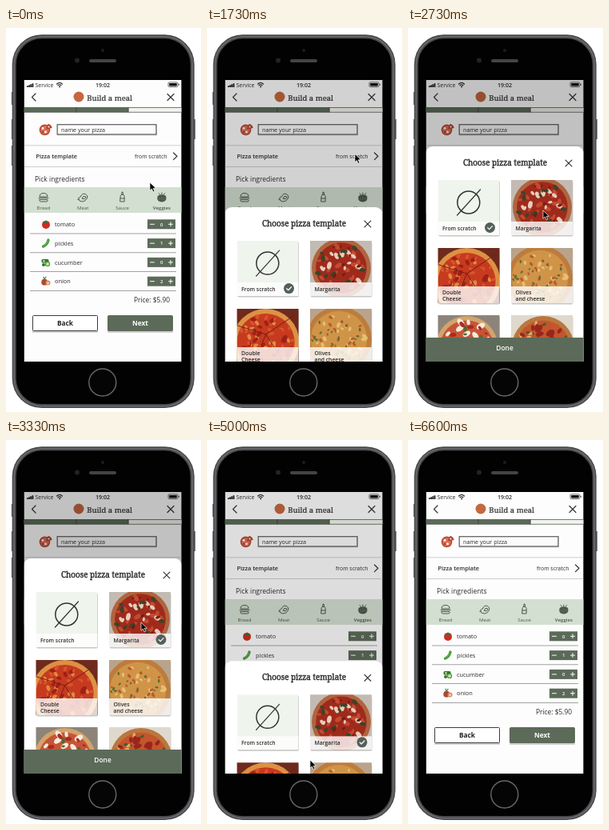
An HTML page that plays this animation: 244x480 px, repeating every 6990 ms.

```html
<!DOCTYPE html>
<html lang="en">
<head>
<meta charset="utf-8">
<title>Build a meal</title>
<style>
html, body { margin: 0; width: 100%; height: 100%; overflow: hidden; background: #fff; }
svg { display: block; }
body > svg { width: 100vw; height: 100vh; }
text { font-family: "Open Sans", "Noto Sans", sans-serif; fill: #2b2b2b; }
.slab { font-family: "Noto Serif", serif; stroke: #2b2b2b; stroke-width: .4; }
.line { fill: none; stroke: #333; stroke-width: 1.2; stroke-linecap: round; stroke-linejoin: round; }
.icon { fill: none; stroke: #4b594b; stroke-width: 1; stroke-linecap: round; stroke-linejoin: round; }
</style>
</head>
<body>
<script>
const LOOP = 6990, STEP = 1000 / 15;
const GREEN = '#5c6b59';

const rect = (x, y, w, h, fill, more = '') =>
  `<rect x="${x}" y="${y}" width="${w}" height="${h}" fill="${fill}" ${more}/>`;
const disc = (x, y, r, fill, more = '') =>
  `<circle cx="${x}" cy="${y}" r="${r}" fill="${fill}" ${more}/>`;
const path = (d, cls = 'line', more = '') => `<path d="${d}" class="${cls}" ${more}/>`;
const shape = (d, fill) => `<path d="${d}" fill="${fill}"/>`;
const text = (x, y, size, str, more = '') =>
  `<text x="${x}" y="${y}" font-size="${size}" ${more}>${str}</text>`;
const bold = 'font-weight="600"', mid = 'text-anchor="middle"';
const cross = (x, y, r) => path(`M${x - r} ${y - r}l${2 * r} ${2 * r}m0 ${-2 * r}l${-2 * r} ${2 * r}`);
const at = (x, y, body) => `<g transform="translate(${x} ${y})">${body}</g>`;

function seeded(seed) {
  return () => (seed = (seed * 16807) % 2147483647) / 2147483647;
}

// Phone body, from the outer rim inwards
function phone() {
  const buttons = [[6.8, 80, 16], [6.8, 114, 25], [6.8, 147, 25], [234, 114, 25]];
  const rims = [[0, '#47474a'], [1.6, '#6c6c70'], [3.2, '#4a4a4d'], [5, '#020202']];
  return buttons.map(([x, y, h]) => rect(x, y, 3, h, '#6a6a6d')).join('') +
    rims.map(([d, fill]) =>
      rect(7.7 + d, 8.3 + d, 228 - 2 * d, 466.8 - 2 * d, fill, `rx="${37 - d}"`)).join('') +
    disc(121, 28, 2, '#1d1d20') + disc(89, 40.5, 3, '#222227') +
    rect(104, 39, 34, 4, '#444447', 'rx="2"') +
    disc(120.8, 443, 17, '#050505', 'stroke="#68686b" stroke-width="1.4"');
}

function statusBar() {
  let s = '';
  for (let i = 0; i < 4; i++) s += rect(26 + i * 2.2, 72.3 - i, 1.7, 1.7 + i, '#111');
  return s + text(36.5, 73.7, 6.9, 'Service') +
    path('M63.5 70q3.5-3.4 7 0M65 71.8q2-1.9 4 0') + disc(67.2, 73.4, .9, '#111') +
    text(121, 73.7, 7.1, '19:02', `${mid} ${bold}`) +
    rect(203, 67.8, 12, 5.8, 'none', 'rx="1.4" stroke="#333" stroke-width=".7"') +
    rect(204.2, 69, 9.6, 3.4, '#111', 'rx=".6"') + rect(215.8, 69.8, 1, 1.8, '#333');
}

function header() {
  const edge = 'stroke="#3d473b" stroke-width=".7"';
  return path('M37 82l-4.5 4.5 4.5 4.5') + disc(91, 86, 6.5, '#c4683f') +
    text(101.3, 90.5, 9.5, 'Build a meal', 'class="slab" style="stroke-width:.2"') + cross(206, 86.5, 4) +
    rect(153, 99.5, 70, 5.7, '#f1f3ee', edge) + rect(20, 99.5, 68, 5.7, GREEN, edge) +
    rect(88, 99.5, 65, 5.7, GREEN, edge);
}

function pizzaIcon() {
  return at(.5, -.6, disc(48, 128, 6.8, '#b8452f') + disc(48, 128, 5.3, '#d9705a') +
    disc(45.5, 126, 1.4, '#fff') + disc(49, 130.5, 1.4, '#fff') + disc(45.5, 130.5, 1, '#8f2c1d') +
    shape('M49 127l3.2-6.6q4 1 5 5.2z', '#b8452f') + disc(53, 124, 1, '#fff'));
}

function categories() {
  const burger = 'M-5-1.5q0-4 5-4t5 4zM-6 .5h12M-5 2.5h10v1.2q0 1.3-1.3 1.3h-7.4q-1.3 0-1.3-1.3z';
  const meat = 'M-5 3q-2-3 2-4 2-5 6-3.5 4 2 2 5.5-2 4-6 4-2.5 0-4-2zM-1 1q1-4 4-2.5 1.5 2-1 3zM-5 1l-1.5 1.5';
  const bottle = 'M-2.5-1.5q0-1.5 1.5-2h2q1.5.5 1.5 2v6.5h-5zM-1-3.5l.5-3.5h1l.5 3.5M-2.5 1h5';
  const veg = shape('M-5.5-1q1-3 5.5-2.5 5-.5 5.5 2.5 1 6-5.5 6.5-6.5-.5-5.500-6.5z', '#4b594b') +
    path('M0-3v-3M-2-3.5l-2-2M2-3.5l2-2', 'icon') +
    path('M-3 0v3M0-1v4M3 0v3', 'icon', 'style="stroke:#78877a;stroke-width:.6"');
  const art = [path(burger, 'icon'), path(meat, 'icon'), path(bottle, 'icon'), veg];
  return rect(22, 199, 198, 32, '#d3dfd1') + ['Bread', 'Meat', 'Sauce', 'Veggies'].map((name, i) => {
    const x = 47 + i * 49.3;
    return at(x, 212, art[i]) +
      text(x, 227, 6.1, name, `${mid} style="fill:#4b594b" ${i === 3 ? bold : ''}`);
  }).join('');
}

function rows() {
  const icons = [
    disc(0, .6, 5, '#cf2d20') + shape('M-3.5-3.5l2.5.5 1-2.5 1 2.5 2.5-.5-2 2.5h-3z', '#35713a'),
    path('M-3.5 4q5-2 6.5-8', 'line', 'style="stroke:#4b9a3f;stroke-width:3.4"') +
      path('M-3 3.5q4-2 5.5-7', 'line', 'style="stroke:#8ac66a;stroke-width:.8;stroke-dasharray:1 1.5"'),
    rect(-5.5, -4, 9, 4.5, '#33752f', 'rx="1.5"') + disc(2, 2, 3.2, '#4c9a40') + disc(2, 2, 2, '#cbe5a2') +
      disc(-3, 3, 2, '#33752f') + disc(-2.5, -1.7, 1.2, '#cbe5a2'),
    disc(-1.8, 1, 3.9, '#a94a32') + disc(2.5, 1.8, 3, '#d98a62') + disc(2.5, 2, 1.5, '#f0d2bd') +
      path('M-2-3l-1-2.5M-1.5-3l1.5-2.5', 'line', 'style="stroke:#4b7c45"')
  ];
  const names = ['tomato', 'pickles', 'cucumber', 'onion'], counts = [0, 1, 0, 2];
  return names.map((name, i) => {
    const y = 245.3 + i * 23.8;
    return at(50, y, icons[i]) + text(61, y + 2.6, 7.4, name) +
      rect(177, y - 6, 35, 12, GREEN) +
      path(`M180.5 ${y}h5M203.5 ${y}h5m-2.5-2.5v5`, 'line', 'style="stroke:#fff;stroke-width:1"') +
      text(194.7, y + 2.2, 6, counts[i], `${mid} ${bold} style="fill:#fff"`) +
      rect(30, y + 11.3, 183, .8, '#8c8c8c');
  }).join('');
}

function button(x, label, fill, ink) {
  return rect(x, 360.5, 82, 20.5, '#000', 'opacity=".18" rx="1"') +
    rect(x + .5, 359.5, 81, 19, fill, `rx="1" stroke="${fill === '#fff' ? '#3c3c3c' : fill}"`) +
    text(x + 41, 372, 8.3, label, `${mid} font-weight="700" style="fill:${ink}"`);
}

function form() {
  return rect(22, 65, 198, 352, '#fdfdfd') + statusBar() + header() + pizzaIcon() +
    rect(64, 121, 125, 13.5, '#000', 'opacity=".15"') +
    rect(64.2, 120.7, 123.8, 12.3, '#fbfbfb', 'stroke="#666" stroke-width="1.3"') +
    text(69, 129.7, 7.2, 'name your pizza') +
    rect(22, 146.5, 198, .7, '#bbb') +
    text(37.5, 163, 7.3, 'Pizza template', bold) +
    text(161, 162.8, 6.9, 'from scratch') + path('M209.5 156l4.5 4.3-4.5 4.3') +
    rect(22, 173, 198, .7, '#bbb') +
    text(36, 192, 8.5, 'Pick ingredients', 'font-weight="500"') + categories() + rows() +
    text(160, 342.5, 8.4, 'Price: $5.90', 'font-weight="500"') +
    button(33, 'Back', '#fff', '#222') + button(127, 'Next', GREEN, '#fff');
}

// Soft pizza picture; each topping is [colour, count, radius].
function pizza(seed, back, cx, cy, r, crust, sauce, toppings) {
  const rnd = seeded(seed);
  let s = rect(-5, -5, 87, 79, back) + disc(cx, cy, r, crust) + disc(cx, cy, r * .86, sauce);
  for (const [fill, count, size] of toppings) {
    for (let i = 0; i < count; i++) {
      const a = rnd() * 6.283, d = Math.sqrt(rnd()) * r * .82, k = size * (.6 + rnd() * .6);
      s += `<ellipse rx="${k}" ry="${k * .6}" fill="${fill}" transform="translate(${cx + d * Math.cos(a)} ${cy + d * Math.sin(a)}) rotate(${rnd() * 180})"/>`;
    }
  }
  return s;
}

const photo = art => `<g filter="url(#soft)">${art}</g>`;

function card(x, y, lines, art) {
  const h = lines.length > 1 ? 21 : 17;
  return rect(x + .5, y + 1.5, 77, 69, '#000', 'opacity=".22" rx="2"') +
    `<svg x="${x}" y="${y}" width="77" height="69">${art}${rect(0, 69 - h, 77, h, '#fff', 'opacity=".8"')}</svg>` +
    lines.map((line, i) => text(x + 5.5, y + (lines.length > 1 ? 58 + i * 8 : 62.7), 6.8, line, bold)).join('');
}

function sheet() {
  const scratch = rect(0, 0, 77, 69, '#eff4ed') +
    disc(38.3, 28, 14, 'none', 'stroke="#333" stroke-width="1.5"') + path('M24 44L53 12');
  const margarita = photo(pizza(11, '#c3bbb3', 39, 34, 37, '#b0643f', '#9f2a1c',
    [['#c24a30', 24, 4], ['#e9cdbb', 14, 4], ['#3a4427', 13, 3.5], ['#6f1c14', 10, 2.5]]));
  const cheese = photo(pizza(23, '#6e2a1c', 36, 42, 42, '#dc9144', '#c63a1f',
    [['#e08a3f', 16, 3.5], ['#9f2016', 18, 4.5], ['#d9542c', 22, 3]]) +
    path('M36 32L-2 20M36 32L72 8M36 32L20 72M36 32L62 72', 'line', 'style="stroke:#761d13;stroke-width:1"'));
  const olives = photo(pizza(37, '#b9a38c', 36, 38, 41, '#bd7c3d', '#d09448',
    [['#e5bf73', 26, 3], ['#b9592c', 18, 2.5], ['#5f6b36', 30, 2]]));
  const greens = photo(pizza(41, '#8d8479', 36, 40, 39, '#d3a36c', '#c65538',
    [['#f3ebdd', 22, 5], ['#4b6c34', 18, 3.5], ['#a92c1f', 12, 3.5]]));
  const salami = photo(pizza(59, '#dfd8cc', 40, 40, 39, '#b97740', '#c4552d',
    [['#e3ab66', 18, 3], ['#97271c', 22, 4.5], ['#47592f', 14, 2.5]]));
  return rect(22, 148, 198, 290, '#fff', 'rx="9"') +
    text(121.5, 172, 9.9, 'Choose pizza template', `${mid} class="slab"`) + cross(201, 169, 3.9) +
    card(37.5, 190, ['From scratch'], scratch) + card(129, 190, ['Margarita'], margarita) +
    card(37.5, 275, ['Double', 'Cheese'], cheese) + card(129, 275, ['Olives', 'and cheese'], olives) +
    card(37.5, 359, [''], greens) + card(129, 359, [''], salami) +
    `<g id="tick">${disc(0, 0, 6.5, '#53615a')}${path('M-2.8 .2l2 2 3.8-4', 'line', 'style="stroke:#fff"')}</g>` +
    rect(22, 387, 198, 31, GREEN) +
    text(121, 402.5, 8.4, 'Done', `${mid} ${bold} style="fill:#fff"`);
}

document.body.innerHTML = `<svg viewBox="0 0 244 480" xmlns="http://www.w3.org/2000/svg">
<filter id="soft"><feGaussianBlur stdDeviation=".6"/></filter>
${phone()}
<svg x="22.8" y="65" width="196.6" height="352" viewBox="22.8 65 196.6 352">
${form()}${rect(22, 65, 198, 352, '#000', 'id="dim"')}<g id="sheet">${sheet()}</g></svg>
<path id="cursor" d="M0 0v10.200l2.400-2.200 1.700 3.800 1.800-.8-1.700-3.700h3.300z" fill="#000" stroke="#fff" stroke-width=".7"/>
</svg>`;

const [dim, panel, tick, cursor] = ['dim', 'sheet', 'tick', 'cursor'].map(id => document.getElementById(id));
const place = (el, x, y) => el.setAttribute('transform', `translate(${x} ${y})`);
const clamp = x => Math.max(0, Math.min(1, x));
const easeOut = x => 1 - Math.pow(1 - clamp(x), 1.7);

// time, x, y of the pointer tip
const moves = [
  [70, 180, 193], [530, 188, 168], [1070, 188, 168], [1130, 185, 157.5], [2200, 185, 157.5],
  [2730, 169, 228], [3660, 169, 228], [4000, 144.5, 370], [4330, 133, 397], [4400, 133, 397], [4530, 129, 400]
];

function pointer(t) {
  const i = moves.findIndex(m => m[0] > t);
  if (i === 0) return moves[0].slice(1);
  if (i < 0) return moves[moves.length - 1].slice(1);
  const [t0, x0, y0] = moves[i - 1], [t1, x1, y1] = moves[i];
  const u = (t - t0) / (t1 - t0), k = u * u * (3 - 2 * u);
  return [x0 + (x1 - x0) * k, y0 + (y1 - y0) * k];
}

function draw(now) {
  const t = Math.floor((now % LOOP + 4) / STEP) * STEP;
  const open = easeOut((t - 1576) / 300) - easeOut((t - 4935) / 205);
  place(panel, 0, 269 * (1 - open));
  dim.setAttribute('opacity', .24 * Math.max(0, open));
  place(tick, t < 2930 ? 102.5 : 194, 249.5);
  place(cursor, ...pointer(t));
  cursor.setAttribute('visibility', t < 5995 ? 'visible' : 'hidden');
}

const start = performance.now();
function frame() {
  draw(performance.now() - start);
  requestAnimationFrame(frame);
}
draw(0);
requestAnimationFrame(frame);
</script>
</body>
</html>
```
